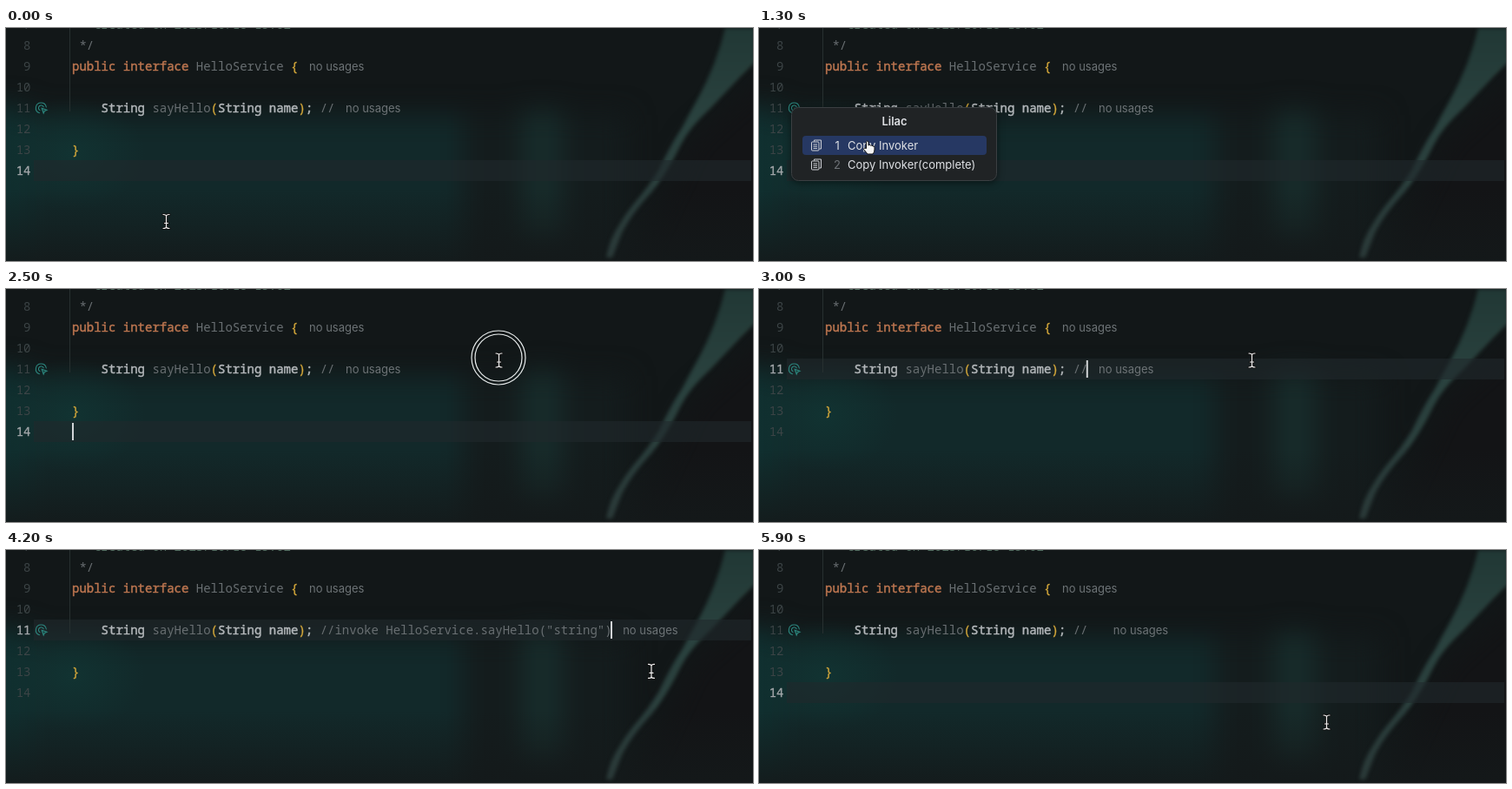
Animation of 860 by 268 pixels, one loop 6 s. Source, as an HTML page:

```html
<!DOCTYPE html>
<html lang="en">
<head>
<meta charset="utf-8">
<title>Editor</title>
<style>
  html, body { margin: 0; width: 100%; height: 100%; overflow: hidden; background: #121718; }
  svg { display: block; width: 860px; height: 268px; }
  text { white-space: pre; }
  .code, .num { font: 400 14px "Noto Sans Mono", "Liberation Mono", monospace; fill: #696f72; }
  .num { text-anchor: end; fill: #3c4446; }
  .num.on { fill: #a4a8ab; stroke: #a4a8ab; stroke-width: .3; }
  .kw { fill: #bd7650; stroke: #bd7650; stroke-width: .45; }
  .id { fill: #b4b8bb; stroke: #b4b8bb; stroke-width: .45; }
  .br { fill: #d2a63a; stroke: #d2a63a; stroke-width: .35; }
  .doc { fill: #526d60; }
  .hint { font: 13px Inter, "Open Sans", sans-serif; fill: #6d7376; }
  .menu { font: 13px Inter, "Open Sans", sans-serif; fill: #dfe1e5; }
</style>
</head>
<body>
<svg viewBox="0 0 860 268">
  <defs>
    <filter id="haze" x="-30%" y="-60%" width="160%" height="220%" color-interpolation-filters="sRGB">
      <feGaussianBlur stdDeviation="15"/>
    </filter>
    <filter id="soft" color-interpolation-filters="sRGB"><feGaussianBlur stdDeviation="2"/></filter>
    <filter id="shade" x="-10%" y="-20%" width="120%" height="150%"><feGaussianBlur stdDeviation="4"/></filter>
    <linearGradient id="wing" x1="0" y1="0" x2="0" y2="1">
      <stop offset="0" stop-color="#213835"/>
      <stop offset=".4" stop-color="#2a423f"/>
      <stop offset="1" stop-color="#2b3a39"/>
    </linearGradient>
    <linearGradient id="floor" x1="0" y1="0" x2="0" y2="1">
      <stop offset="0" stop-color="#14191a" stop-opacity="0"/>
      <stop offset="1" stop-color="#14191a" stop-opacity=".85"/>
    </linearGradient>
    <radialGradient id="glow">
      <stop offset="0" stop-color="#113735" stop-opacity=".7"/>
      <stop offset="1" stop-color="#113735" stop-opacity="0"/>
    </radialGradient>
    <g id="page" fill="none" stroke="#ced0d6">
      <path d="M-2.5-4.5v-1.5h8v10h-2"/>
      <rect x="-5.5" y="-4" width="8.5" height="10" rx="1"/>
      <path d="M-3.5-1h4.5M-3.5 1.2h4.5M-3.5 3.4h4.5"/>
    </g>
    <path id="bar" d="M-3.5-8Q0-8 0-6Q0-8 3.5-8M0-6V6M-3.5 8Q0 8 0 6Q0 8 3.5 8M-2 2H2"/>
    <g id="beam" fill="none" stroke-linecap="round">
      <use href="#bar" stroke="#111" stroke-width="3"/>
      <use href="#bar" stroke="#eee" stroke-width="1.2"/>
    </g>
  </defs>

  <rect width="860" height="268" fill="#121718"/>
  <g filter="url(#haze)">
    <rect x="-60" y="100" width="585" height="230" fill="#12292a"/>
    <rect x="-60" y="90" width="85" height="240" fill="#102f2f"/>
    <rect x="525" y="100" width="190" height="230" fill="#141c1d"/>
    <rect x="594" y="95" width="46" height="150" fill="#172c2b"/>
    <path d="M880 50L790 130L715 290H920V50Z" fill="#131416"/>
  </g>
  <ellipse cx="75" cy="145" rx="85" ry="65" fill="url(#glow)"/>
  <rect y="185" width="860" height="83" fill="url(#floor)"/>
  <g filter="url(#soft)">
    <path d="M828 0H862V38L845 55L810 92Q786 114 776 134Q762 165 744 188Q719 215 709 236L698 264H691Q695 243 705 228Q713 214 722 203Q741 181 752 162Q766 133 778 115L797 80Q818 42 828 0Z" fill="url(#wing)"/>
    <path d="M862 38L845 55L810 92Q786 114 776 134Q762 162 746 182" fill="none" stroke="#35504a" stroke-width="2" opacity=".6"/>
  </g>

  <rect id="row" x="32" width="826" height="24" fill="#20282c" opacity=".6"/>
  <path d="M73.5 0V96" stroke="#273030"/>
  <g id="nums"></g>

  <text class="code doc" x="101.2" y="1">Created on 2023/10/18 15:02</text>
  <text class="code" x="84.4" y="25">*/</text>
  <text class="code" x="76" y="49"><tspan class="kw">public interface</tspan> HelloService <tspan class="br">{</tspan></text>
  <text class="hint" x="349" y="49">no usages</text>
  <text class="code" x="109.6" y="97"><tspan class="id">String</tspan> sayHello<tspan class="br">(</tspan><tspan class="id">String name</tspan><tspan class="br">)</tspan><tspan class="id">;</tspan> //<tspan id="pasted"></tspan></text>
  <text class="hint" id="usages" y="97">no usages</text>
  <text class="code br" x="76" y="145">}</text>

  <g fill="none" stroke="#2c857d" stroke-width="1.1" stroke-linecap="round">
    <path d="M38.5 97.7A6 6 0 1 1 46.3 91M39 94.6A3 3 0 1 1 43.2 90.8"/>
    <path d="M41.2 92.3L47 94.3L44.4 95.4L43.2 98Z" fill="#173c38"/>
  </g>
  <rect id="caret" width="2" height="20" fill="#d2d5d8"/>

  <g id="popup">
    <rect x="37" y="93" width="237" height="85" rx="8" fill="#000" opacity=".5" filter="url(#shade)"/>
    <rect x="37.5" y="91.5" width="236" height="84" rx="8" fill="#202325" stroke="#3b3f42"/>
    <rect x="50" y="124" width="212" height="22" rx="4" fill="#263863"/>
    <text class="menu" x="156" y="112" text-anchor="middle" style="font-weight:600">Lilac</text>
    <use href="#page" x="66" y="135"/>
    <use href="#page" x="66" y="157"/>
    <text class="menu" x="87.5" y="140">1</text>
    <text class="menu" x="102" y="140">Copy Invoker</text>
    <text class="menu" x="86" y="162" style="fill:#6f7378">2</text>
    <text class="menu" x="102" y="162">Copy Invoker(complete)</text>
  </g>

  <g id="ring" fill="none" stroke="#e9eded" stroke-width="1.2">
    <circle cx="567" cy="79" r="31"/>
    <circle cx="567" cy="79" r="27"/>
  </g>
  <use id="trail" href="#beam" x="569.5" y="97"/>
  <g id="mouse">
    <use id="text" href="#beam"/>
    <path id="arrow" d="M0 0V14.5L3.5 11.3L6 17L8.6 15.8L6.1 10.4H10.6Z" fill="#111" stroke="#f2f2f2" stroke-width="1.2" stroke-linejoin="round"/>
    <path id="hand" d="M-3.5 1.5V-6Q-2.2-8-1-6V-2Q.5-3.4 1.6-1.8Q3.2-2.8 4-1Q6-1.6 6 .5V3Q6 6 4 8H-2L-6.5 2.5Q-6.2 0-3.5 1.5Z" fill="#f4f4f4" stroke="#111"/>
  </g>
</svg>
<script>
  const LOOP = 6000, STEP = 100, CHAR = 8.4;
  const CALL = 'invoke HelloService.sayHello("string")';
  // moments of the story, in ms
  const OPEN = 1000, CLOSE = 1600, CLICK = 2500, PASTE = 3200, UNDO = 4700;
  const $ = id => document.getElementById(id);
  const show = (id, on) => { $(id).style.display = on ? "" : "none"; };
  const within = (t, a, b) => t >= a && t < b;
  const lineY = n => 20 + (n - 8) * 24;

  $("nums").innerHTML = [7, 8, 9, 10, 11, 12, 13, 14].map(n =>
    `<text class="num" id="n${n}" x="28.5" y="${lineY(n) + 5}">${n}</text>`).join("");

  // time, x, y
  const path = [
    [0, 184.5, 222.5], [100, 184.5, 222.5], [700, 40, 92], [800, 38.5, 90], [1000, 38.5, 90],
    [1300, 127, 137], [1600, 127, 137], [2400, 567.5, 82], [3400, 567.5, 82],
    [3500, 569.5, 97], [3600, 584.5, 105], [3800, 743, 128], [3900, 743, 128],
    [4600, 743, 157], [5200, 659, 203], [5400, 659, 203], [5900, 653.5, 198], [LOOP, 653.5, 198]
  ];
  const carets = [[500, 1000], [1500, 2000], [CLICK, PASTE + 500], [4200, UNDO + 700]];

  function mouseAt(t) {
    const i = path.findIndex(p => p[0] > t);
    const [t0, x0, y0] = path[i - 1], [t1, x1, y1] = path[i];
    const u = (t - t0) / (t1 - t0), k = u * u * (3 - 2 * u);
    return [x0 + (x1 - x0) * k, y0 + (y1 - y0) * k];
  }

  function draw(t) {
    const line = within(t, CLICK + STEP, UNDO) ? 11 : 14;
    const pasted = within(t, PASTE, UNDO);
    const popup = within(t, OPEN, CLOSE);
    const extra = pasted ? CALL.length : t >= UNDO ? 2 : 0;
    const end = 378.4 + extra * CHAR;

    $("row").setAttribute("y", lineY(line) - 12);
    for (const n of [11, 14]) $("n" + n).classList.toggle("on", n === line);
    $("pasted").textContent = pasted ? CALL : "";
    $("usages").setAttribute("x", end + 12.6);
    $("caret").setAttribute("x", line === 11 ? end - 1.6 : 76);
    $("caret").setAttribute("y", lineY(line) - 10);

    show("caret", carets.some(([a, b]) => within(t, a, b)));
    show("popup", popup);
    show("ring", within(t, CLICK, CLICK + 300));
    show("trail", within(t, 3600, 3700));
    show("mouse", !within(t, UNDO, 5200));

    const [x, y] = mouseAt(t);
    const inMenu = popup && x > 50 && y > 122;
    const arrow = !inMenu && (popup || x < 72);
    $("mouse").setAttribute("transform", `translate(${x} ${y})`);
    show("hand", inMenu);
    show("arrow", arrow);
    show("text", !inMenu && !arrow);
  }

  const start = performance.now();
  function tick() {
    const t = (performance.now() - start) % LOOP;
    draw(Math.floor(t / STEP) * STEP);
    requestAnimationFrame(tick);
  }
  tick();
</script>
</body>
</html>
```
